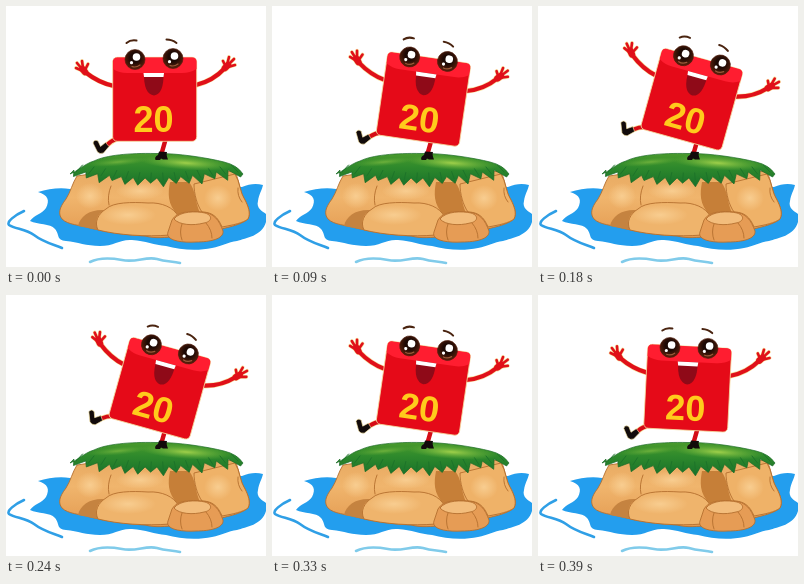
Write an HTML page that moves like this. It is 260x261 px and loops after 0.42 s.

```html
<!DOCTYPE html>
<html lang="en">
<head>
<meta charset="utf-8">
<title>Dancing packet</title>
<style>
html, body { margin: 0; width: 100%; height: 100%; overflow: hidden; background: #fff; }
svg { display: block; width: 100vw; height: 100vh; }
.line { fill: none; stroke-linecap: round; stroke-linejoin: round; }
</style>
</head>
<body>
<svg viewBox="0 0 260 261" preserveAspectRatio="none">
  <defs>
    <linearGradient id="rock" x1="0" y1="0" x2="0" y2="1">
      <stop offset="0" stop-color="#e6a75f"/>
      <stop offset=".45" stop-color="#f0b56d"/>
      <stop offset="1" stop-color="#e39a50"/>
    </linearGradient>
    <radialGradient id="shine">
      <stop offset="0" stop-color="#f8cd90"/>
      <stop offset="1" stop-color="#f8cd90" stop-opacity="0"/>
    </radialGradient>
    <linearGradient id="grass" x1="0" y1="0" x2="0" y2="1">
      <stop offset="0" stop-color="#4a9a2c"/>
      <stop offset=".4" stop-color="#2f8a2c"/>
      <stop offset="1" stop-color="#17702a"/>
    </linearGradient>
    <radialGradient id="glow">
      <stop offset="0" stop-color="#9fd04a"/>
      <stop offset="1" stop-color="#6fb53a" stop-opacity="0"/>
    </radialGradient>
    <radialGradient id="iris" cx=".5" cy=".4" r=".6">
      <stop offset=".4" stop-color="#1d0904"/>
      <stop offset="1" stop-color="#5c220c"/>
    </radialGradient>
    <g id="eye">
      <circle r="10" fill="url(#iris)" stroke="#4a1a0a" stroke-width=".6"/>
      <circle cx="1.500" cy="-2.500" r="3.800" fill="#fff"/>
      <circle cx="-3.500" cy="3.200" r="1.600" fill="#fff"/>
      <path d="M-3 7Q1 8.500 5 5.500" class="line" stroke="#9a5a3a" stroke-width="1.200"/>
    </g>
  </defs>

  <!-- water -->
  <path fill="#239eee" d="M64 183C54 181 42 183 32 186C42 189 44 194 40 202C36 208 28 209 24 215C32 219 44 217 49 223C54 229 50 234 60 235C72 236 80 240 94 240C108 240 114 233 126 234C140 235 148 239 160 240C174 244 192 245 206 242C216 240 222 236 231 235C240 232 256 230 260 216V208C256 205 250 202 252 195C253 188 256 184 257 179C250 177 243 178 236 181Z"/>
  <g class="line" stroke="#2f9fe6" stroke-width="2.600">
    <path d="M18 205C9 209 0 216 3 219C9 223 20 223 28 229C37 236 46 238 56 242"/>
    <path stroke="#80cbea" d="M84 256C94 251 105 252 116 254C130 257 140 250 151 253C160 256 166 255 174 257"/>
  </g>

  <!-- island -->
  <g stroke="#b5702f" stroke-width=".9" stroke-linejoin="round">
    <path fill="url(#rock)" d="M71 170C66 178 65 185 60 193C53 202 52 208 56 213C62 219 74 219 84 222C104 227 122 229 139 230C150 233 160 231 170 231L206 225C220 222 235 219 242 213C245 207 242 200 239 194C234 187 234 176 229 166L150 158Z"/>
    <path fill="#c58340" stroke="none" d="M72 220C74 210 84 203 99 204C91 208 88 215 92 224Z"/>
    <path fill="#c67f38" stroke="none" d="M164 176H183C190 184 189 196 194 207L172 209C161 198 162 187 164 176Z"/>
    <path fill="#efb46c" d="M92 224C88 216 92 208 100 203C107 196 126 196 142 197C156 196 168 202 172 210C171 216 164 222 164 229C140 231 112 229 92 224Z"/>
    <path fill="#efb268" d="M188 178C188 188 191 199 196 206C206 206 212 211 216 221C227 219 237 217 242 213C245 207 242 200 239 194C234 187 234 176 229 168Z"/>
    <path fill="#e69c55" d="M166 214C171 205 185 205 196 206C208 207 213 214 217 225C218 233 204 236 190 236C174 237 159 234 162 226Z"/>
    <path fill="#f3bd7c" d="M168 213C174 205 190 205 199 207C208 210 205 216 198 217C187 220 173 219 168 213Z"/>
    <path class="line" d="M105 180Q101 190 103 199M232 182Q231 190 236 196M176 218Q173 226 176 234M200 217Q206 224 206 232"/>
  </g>
  <ellipse cx="122" cy="209" rx="28" ry="10" fill="url(#shine)"/>
  <ellipse cx="134" cy="185" rx="24" ry="9" fill="url(#shine)"/>
  <ellipse cx="84" cy="190" rx="14" ry="13" fill="url(#shine)"/>
  <ellipse cx="212" cy="192" rx="14" ry="13" fill="url(#shine)"/>
  <path id="turf" fill="url(#grass)" stroke="#1b6a26" stroke-width=".7" stroke-linejoin="round"/>
  <ellipse cx="180" cy="157" rx="46" ry="7" fill="url(#glow)" transform="rotate(4 180 157)"/>
  <ellipse cx="112" cy="156" rx="30" ry="4" fill="url(#glow)" opacity=".5" transform="rotate(-5 112 156)"/>
  <path id="blades" class="line" stroke="#1d7329" stroke-width="1"/>

  <!-- planted leg -->
  <path class="line" stroke="#d50c16" stroke-width="4.500" d="M160 132L156 146"/>
  <path fill="#120b0b" d="M153 145.500L161 146Q160 149 162 153.500H157L155 152.500L154 154H149.500Q148 151 152 149Z"/>

  <g id="hero">
    <g id="kick">
      <path class="line" stroke="#f6e3a2" stroke-width="5.500" d="M113 132Q106 134 101 139"/>
      <path class="line" stroke="#d50c16" stroke-width="4" d="M113 132Q106 134 101 139"/>
      <path fill="#120b0b" stroke="#f6e3a2" stroke-width=".6" d="M87 137Q88 133 92 135L94.500 140.500L99.500 136.500L103 140.500L97.500 147Q94 148.500 91.500 146Z"/>
    </g>
    <g id="arms" class="line"></g>
    <rect x="106.700" y="51.300" width="84" height="84" rx="4.500" fill="#e50a18" stroke="#f5dca0" stroke-width=".8"/>
    <path fill="#ff1d30" d="M107 63V56Q107 51.500 111.500 51.500H186Q190.500 51.500 190.500 56V63Q184 67 176 67H121Q113 67 107 63Z"/>
    <use href="#eye" x="129" y="53.500"/>
    <use href="#eye" x="167" y="52.500"/>
    <path class="line" stroke="#4a2410" stroke-width="2" d="M120.500 37Q124.500 33.500 130.500 34.500M160.500 33.500Q166 33.500 170.500 37"/>
    <path fill="#8f0a18" d="M138 67H157.500Q158 88 148 89.500Q137.500 88 138 67Z"/>
    <path fill="#fff" d="M137.500 67H158L157.500 71H138Z"/>
    <text x="147.500" y="125.500" text-anchor="middle" font-family="Arial, 'Liberation Sans', sans-serif" font-weight="700" font-size="36" fill="#ffcb1c">20</text>
  </g>
</svg>
<script>
const el = id => document.getElementById(id);

// ragged hem of the turf
let turf = "M64 168C72 165 78 158 88 155C100 149 124 147 149 147.500C172 147 202 152 218 156Q231 159 237 168";
let blades = "";
const teeth = 14;
for (let i = 0; i < teeth; i++) {
  const u = (i + 0.5) / teeth;
  const x = 234 - 166 * u;
  const hem = 163 + 9 * Math.sin(Math.PI * u);
  const drop = 7 + 2 * Math.sin(i * 2.4);
  const lean = (0.5 - u) * 14;
  turf += `L${x + lean} ${hem + drop}L${x - 6} ${hem}`;
  blades += `M${x - lean * 0.4} ${hem - 5}L${x + lean * 0.6} ${hem + 2}`;
}
el("turf").setAttribute("d", turf + "Z");
el("blades").setAttribute("d", blades);

// arms: pale rim below, red above
const limbs = [
  ["M108 80Q93 77 79 66", 4.2],
  ["M190 79Q207 75 219 62", 4.2],
  ["M79 66L76.500 63M219 62L222 59", 6.5],
  ["M77 65L70 62M76 63L71 57M77 62L76 55M79 64L82 58", 2.6],
  ["M220 61L217 55M221 59L223 51M222 59L228 53M222 61L229 59", 2.6]
];
const draw = (rim, color) => limbs.map(([d, w]) =>
  `<path d="${d}" stroke="${color}" stroke-width="${w + rim}"/>`).join("");
el("arms").innerHTML = draw(1.2, "#f6e3a2") + draw(0, "#e01019");

const STEP = 30, COUNT = 14;
function render(ms) {
  const i = Math.floor(ms / STEP) % COUNT;
  const k = Math.min(i, COUNT - i);
  const tilt = 2.95 * k - 0.06 * k * k;
  el("hero").setAttribute("transform", `rotate(${tilt} 151 112)`);
  el("kick").setAttribute("transform", `rotate(${tilt * 0.3} 113 131)`);
}

const start = performance.now();
function tick() {
  render(performance.now() - start);
  requestAnimationFrame(tick);
}
render(0);
requestAnimationFrame(tick);
</script>
</body>
</html>
```
